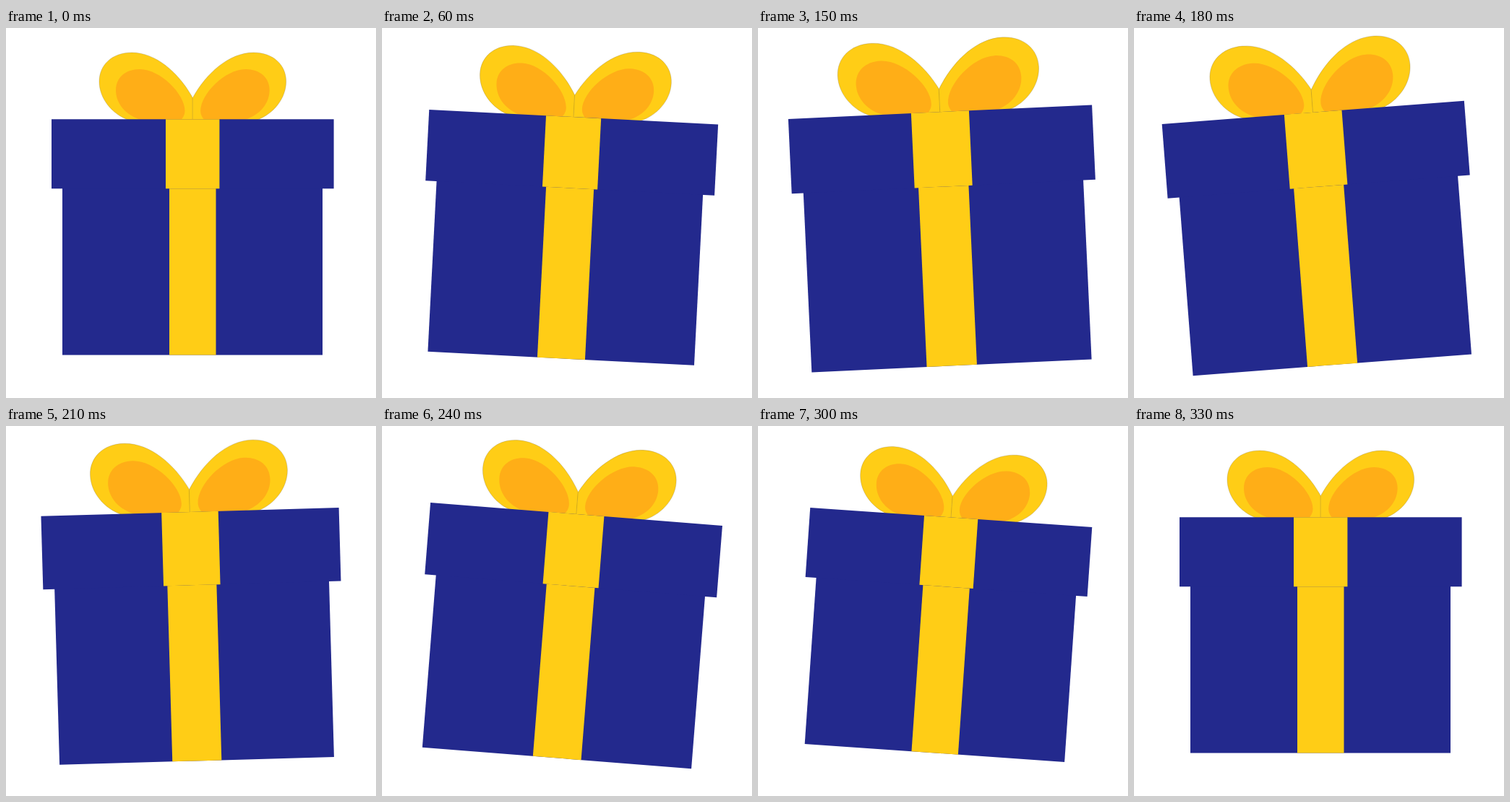
An HTML page that plays this animation: 512 by 512 pixels, repeating every 0.36 s.

```html
<!DOCTYPE html>
<html lang="en">
<head>
<meta charset="utf-8">
<title>Shaking gift box</title>
<style>
  html, body { margin: 0; width: 100%; height: 100%; overflow: hidden; background: #fff; }
  svg { display: block; width: 100vw; height: 100vh; }
  .blue { fill: #23298d; }
  .gold { fill: #ffcd16; }
  .amber { fill: #ffae17; }
  .outer { stroke: #5a4f30; stroke-width: .35; stroke-opacity: .6; }
</style>
</head>
<body>
<svg viewBox="0 0 512 512">
  <defs>
    <g id="loop">
      <path class="gold outer" d="M258.5 97C240 63 208 34 174 34C147 34 129 51 129 74C129 97 146 119 170 127.5H258.5Z"/>
      <path class="amber" d="M188 127.5C165 121 152 104 152 86C152 68 166 57 185 57C213 57 247.5 91 247.5 115C247.5 120 245 124 242 127.5Z"/>
    </g>
  </defs>
  <g id="gift">
    <use href="#loop"/>
    <use href="#loop" transform="translate(516.6 0) scale(-1 1)"/>
    <path class="blue" d="M78 200H438V452.6H78Z"/>
    <path class="gold" d="M226 200H290.5V452.6H226Z"/>
    <path class="blue" d="M63 126.15H453.6V222.2H63Z"/>
    <path class="gold" d="M221 126.15H295.4V222.2H221Z"/>
  </g>
</svg>
<script>
  const STEP = 30;
  const tilt = [0, 0.9, 2.95, 4.8, 2.2, -2.66, -4.4, -1.63, 4.54, 5, 3.96, 0];
  const gift = document.getElementById('gift');

  // Steady swell, then steady shrink back to full rest.
  const swell = k => 1 + Math.max(0, Math.min((k - 0.55) * 0.0173, (10.05 - k) * 0.0182));

  function draw(ms) {
    const k = Math.floor(ms / STEP) % tilt.length;
    gift.setAttribute('transform',
      `translate(256 256) rotate(${tilt[k]}) scale(${swell(k)}) translate(-256 -256)`);
  }

  const start = performance.now();
  function tick() {
    draw(performance.now() - start);
    requestAnimationFrame(tick);
  }
  tick();
</script>
</body>
</html>
```
